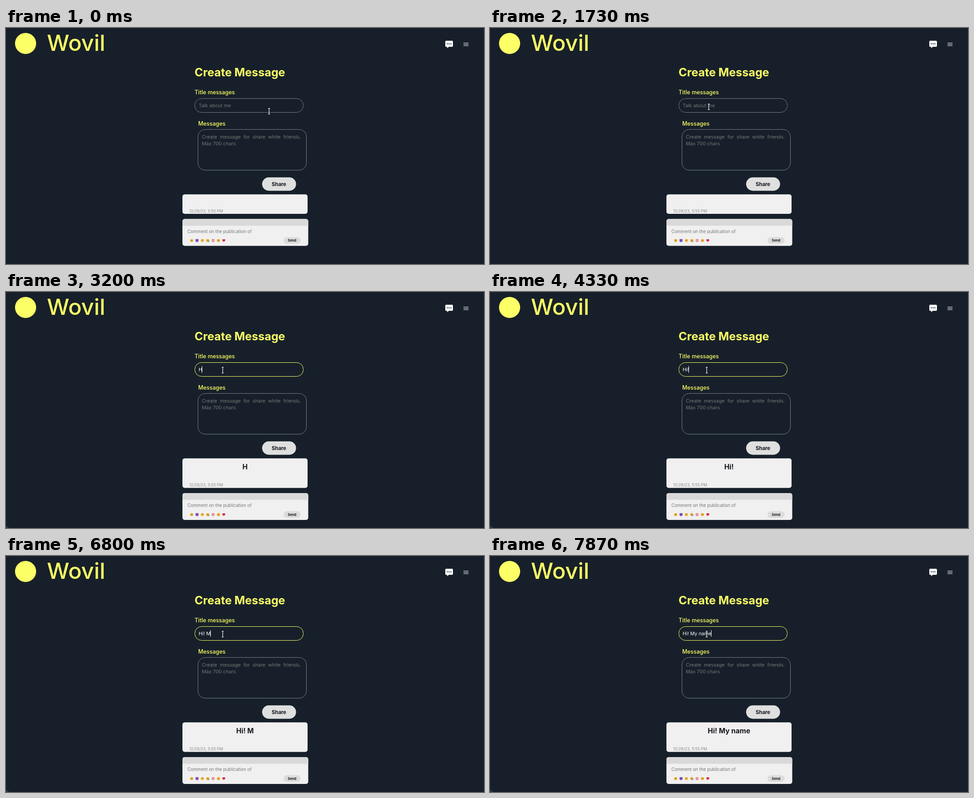
An HTML page that plays this animation: 1062x527 px, repeating every 8000 ms.

```html
<!DOCTYPE html>
<html lang="en">
<head>
<meta charset="utf-8">
<title>Create Message</title>
<style>
  html, body { margin: 0; width: 100%; height: 100%; overflow: hidden; background: #17202a; }
  svg { display: block; width: 100%; height: 100%; }
  text { font-family: Inter, "Open Sans", sans-serif; white-space: pre; }
  .yellow { fill: #fdff66; }
  .label { font-size: 12.4px; font-weight: 500; }
  .hint { font-size: 10.8px; fill: #757575; }
  .field { fill: none; stroke: #7c8086; }
  .field.active { stroke: #fdff66; }
  .small { font-size: 9.8px; fill: #777; }
  .date { font-size: 8.7px; fill: #8a8a8a; }
  .dark { fill: #17181f; font-weight: 700; text-anchor: middle; }
</style>
</head>
<body>
<svg viewBox="0 0 1062 527" xmlns="http://www.w3.org/2000/svg">
  <rect width="1062" height="527" fill="#17202a"/>

  <!-- header -->
  <circle class="yellow" cx="43.5" cy="34.5" r="23.5"/>
  <text class="yellow" x="91" y="51" font-size="49.5" font-weight="500">Wovil</text>
  <path fill="#fff" d="M978 28.5h13a2 2 0 0 1 2 2v9.5a2 2 0 0 1-2 2h-7l-4 3v-3h-2a2 2 0 0 1-2-2v-9.500a2 2 0 0 1 2-2z"/>
  <path d="M980.6 35.2h8" stroke="#17202a" stroke-width="2.400" stroke-linecap="round" stroke-dasharray="0 3.9"/>
  <path d="M1016.5 33.5h11m-11 3h11m-11 3h11" stroke="#fff" stroke-width="1.2"/>

  <!-- form -->
  <text class="yellow" x="419" y="108" font-size="25.3" font-weight="700">Create Message</text>
  <text class="yellow label" x="419" y="148">Title messages</text>
  <rect id="field" class="field" x="419.5" y="157.5" width="241" height="31" rx="15"/>
  <text id="hint" class="hint" x="428" y="177">Talk about me</text>
  <text id="typed" x="428" y="177" font-size="10.8" fill="#fff"></text>
  <rect id="caret" y="165.5" width="1" height="15" fill="#fff"/>
  <text class="yellow label" x="427" y="218">Messages</text>
  <rect class="field" x="426.5" y="226.5" width="241" height="91" rx="16"/>
  <text class="hint" x="435" y="246.5" word-spacing="3.2">Create message for share white friends.</text>
  <text class="hint" x="435" y="262">Máx 700 chars</text>
  <rect x="569" y="333.5" width="75.5" height="30" rx="15" fill="#dfdfdf"/>
  <text class="dark" x="606.5" y="353" font-size="11.4">Share</text>

  <!-- preview card -->
  <rect id="card" x="392" y="371.5" width="278" rx="5" fill="#f0f0f0"/>
  <text id="heading" class="dark" x="531" y="396" font-size="15.5"></text>

  <!-- parts pushed down when the card grows -->
  <g id="lower">
    <text class="date" x="407" y="411.5">12/28/23, 5:55 PM</text>
    <rect x="392" y="426.5" width="279.5" height="60" rx="5" fill="#f0f0f0"/>
    <path d="M392 441.5v-10a5 5 0 0 1 5-5h269.5a5 5 0 0 1 5 5v10z" fill="#d9d9d9"/>
    <text class="small" x="403" y="457.5">Comment on the publication of</text>
    <rect x="616.5" y="467" width="38" height="15" rx="7.5" fill="#dcdcdc"/>
    <text class="dark" x="635.5" y="477.2" font-size="7.5">Send</text>
    <g id="faces"></g>
  </g>

  <path id="corner" d="M.5 522q0 4.500 5 4.500" fill="none" stroke="#2a7f9c"/>
  <g id="pointer">
    <path id="arrow" d="M0 0l10.5 8.5l-5.5 1l-4.500 5.500z" fill="#fff"/>
    <path id="beam" d="M-2-6.300h4M-2 6.300h4M0-6v12" stroke="#fff" stroke-width="1.2"/>
  </g>
</svg>
<script>
const LOOP = 8000, STEP = 200 / 3, BLINK = 500, FOCUS = 1770, GROW = 22.5;
const TITLE = "Hi! My name";
const keyTimes = [3200, 3400, 4330, 5000, 5800, 7070, 7270, 7530, 7660, 7730, 7860];

// key points of the pointer: time, x, y
const path = [
  [0, 584.5, 186], [333, 1150, 445], [467, 1005, 116], [733, 405, 366], [933, 673.5, 340.5],
  [1267, 503, 242], [1533, 486, 176], [1733, 486, 176], [2267, 503, 176], [2400, 503, 176],
  [2467, 481.5, 174.5], [LOOP, 481.5, 174.5]
];

const el = id => document.getElementById(id);
const set = (id, attrs) => {
  for (const key in attrs) el(id).setAttribute(key, attrs[key]);
};
const show = (id, on) => set(id, { visibility: on ? "visible" : "hidden" });

function pointerAt(t) {
  const next = Math.max(1, path.findIndex(p => p[0] > t));
  const [t0, x0, y0] = path[next - 1], [t1, x1, y1] = path[next];
  const part = (t - t0) / (t1 - t0);
  return [x0 + (x1 - x0) * part, y0 + (y1 - y0) * part];
}

function overField(x, y) {
  return [...document.querySelectorAll(".field")].some(field => {
    const box = field.getBBox();
    return x > box.x && x < box.x + box.width && y > box.y && y < box.y + box.height;
  });
}

function drawPointer(t) {
  const [x, y] = pointerAt(t);
  const beam = overField(x, y);
  set("pointer", { transform: `translate(${x} ${y})` });
  show("beam", beam);
  show("arrow", !beam);
}

function drawTitle(t) {
  const count = keyTimes.filter(k => k <= t + 4).length;
  const focused = t >= FOCUS;
  const lastInput = count ? keyTimes[count - 1] : FOCUS;
  const grow = count ? GROW : 0;

  el("typed").textContent = TITLE.slice(0, count);
  el("heading").textContent = TITLE.slice(0, count).trimEnd();
  show("hint", !count);
  el("field").classList.toggle("active", focused);
  show("corner", focused);

  const width = count ? el("typed").getComputedTextLength() : 0;
  set("caret", { x: Math.round(427.3 + width) });
  show("caret", focused && Math.floor((t + 4 - lastInput) / BLINK) % 2 === 0);

  set("card", { height: 43.5 + grow });
  set("lower", { transform: `translate(0 ${grow})` });
}

function draw(time) {
  const t = Math.floor((time + 4) / STEP) * STEP;
  drawTitle(t);
  drawPointer(t);
}

function drawFaces() {
  const stroke = (d, color, width) =>
    `<path d="${d}" fill="none" stroke="${color}" stroke-width="${width}"/>`;
  const face = (mouth, color = "#f9bd3c", ink = "#5c4220") =>
    `<circle r="3.6" fill="${color}"/>` + stroke("M-1.9-.6h1.2m1.4 0h1.2", ink, 1.2) + stroke(mouth, ink, 0.7);
  const frown = "M-1.5 2q1.5-1.4 3 0", smile = "M-1.5 1.2q1.5 1.4 3 0";
  const horns = '<path d="M-3.6-3.6l2.6 1.5l-2 1.5zM3.6-3.6l-2.6 1.5l2 1.5z" fill="#7a55b5"/>';
  const spark = [0, 90, 180, 270].map(a =>
    `<g transform="rotate(${a})">${stroke("M1.2-3.2v2h2", "#e23a4c", 1.2)}</g>`).join("");
  const heart = '<path d="M0 3.2l-3-3a2 2 0 0 1 3-2.600a2 2 0 0 1 3 2.600z" fill="#df2440"/>';
  const tear = '<circle cx="2.4" cy="2" r="1.4" fill="#46a9d8"/>';

  el("faces").innerHTML = [
    face(frown), horns + face(smile, "#8862c4", "#3d2464"), face("M-.5 1.700h1"),
    face(frown) + tear, spark, face(smile), heart
  ].map((icon, i) => `<g transform="translate(${412.5 + i * 11.9} 474.5)">${icon}</g>`).join("");
}

drawFaces();
draw(0);
const begin = performance.now();
(function tick() {
  draw((performance.now() - begin) % LOOP);
  requestAnimationFrame(tick);
})();
</script>
</body>
</html>
```
